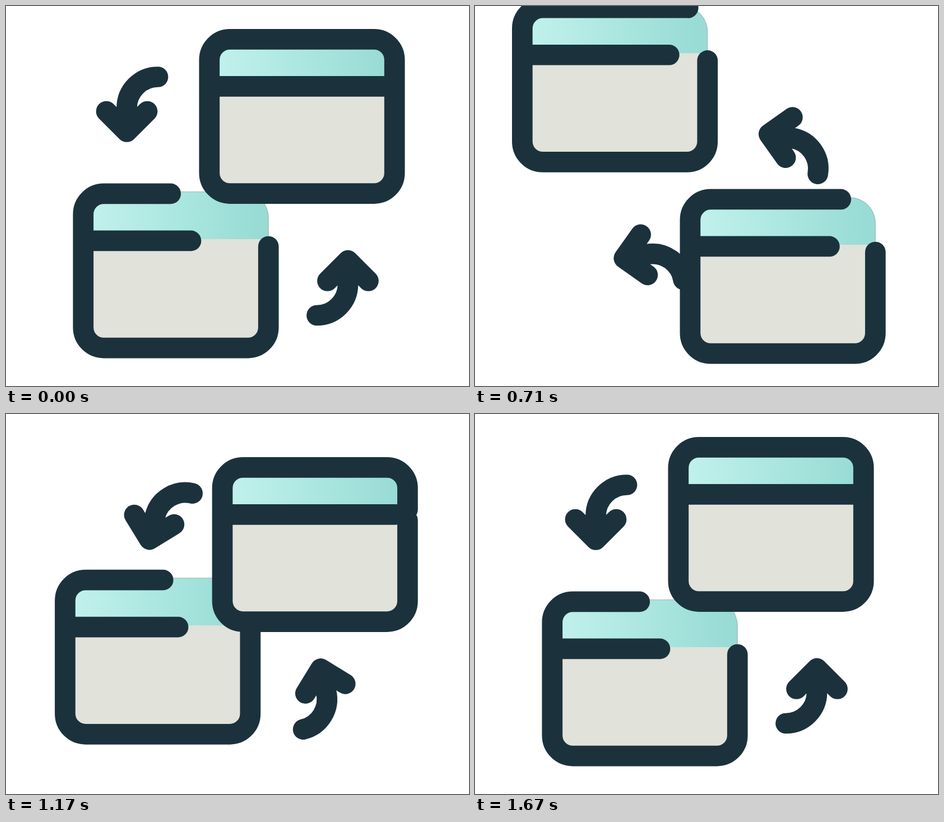
These frames come from a looping animation (826x678 px, 4000 ms). An HTML page with a canvas:

```html
<!DOCTYPE html>
<html lang="en">
<head>
<meta charset="utf-8">
<title>Swap windows</title>
<style>
html, body { margin: 0; width: 100%; height: 100%; overflow: hidden; background: #fff; }
canvas { display: block; }
</style>
</head>
<body>
<canvas id="stage" width="826" height="678"></canvas>
<script>
const ctx = document.getElementById('stage').getContext('2d');
const INK = '#1b323c', LINE = 36.7;
const LOOP = 4000, FPS = 24, FIRST = 10, STEPS = 30;

function track(d) {
  const path = document.createElementNS('http://www.w3.org/2000/svg', 'path');
  path.setAttribute('d', d);
  const length = path.getTotalLength();
  return e => path.getPointAtLength(length * e);
}

const windowUp = track('M303 472.5 C613.5 590 658.5 380 528 197');
const windowDown = track('M528 197 C203 -23 108 264 303 472.5');
const arrowDown = track('M215.5 206.5 C210.5 472 230 472 610 472');
const arrowUp = track('M610 472 C615 206.5 595.5 206.5 215.5 206.5');

// cubic-bezier(.333, 0, 0, 1), solved by bisection
function ease(x) {
  if (x <= 0) return 0;
  if (x >= 1) return 1;
  let lo = 0, hi = 1;
  for (let i = 0; i < 30; i++) {
    const s = (lo + hi) / 2;
    if ((1 - s) ** 2 * s + s ** 3 < x) lo = s; else hi = s;
  }
  return lo * lo * (3 - 2 * lo);
}

function inkStroke() {
  ctx.strokeStyle = INK;
  ctx.lineWidth = LINE;
  ctx.stroke();
}

function drawArrow(pos, turn) {
  ctx.save();
  ctx.translate(pos.x, pos.y);
  ctx.rotate(turn);
  ctx.beginPath();
  ctx.moveTo(55.5, -80);
  ctx.arc(55.5, -24.5, 55.5, -Math.PI / 2, Math.PI, true);
  ctx.lineTo(0, 18);
  ctx.moveTo(-36.5, -18.5);
  ctx.lineTo(0, 18);
  ctx.lineTo(36.5, -18.5);
  inkStroke();
  ctx.restore();
}

// closed: 0 leaves the top right corner open, 1 joins the outline
function drawWindow(pos, closed) {
  const w = 165.2, h = 137.6, r = 36.7;
  ctx.save();
  ctx.translate(pos.x, pos.y);

  ctx.fillStyle = '#e1e2da';
  ctx.beginPath();
  ctx.roundRect(-w, -57, 2 * w, h + 57, [0, 0, r, r]);
  ctx.fill();

  const teal = ctx.createLinearGradient(-w + 18, 0, w - 18, 0);
  teal.addColorStop(0, '#c0f1ec');
  teal.addColorStop(1, '#98dcd5');
  ctx.beginPath();
  ctx.moveTo(-w, -56.5);
  ctx.lineTo(-w, -95);
  ctx.arcTo(-w, -141, -w + 46, -141, 46);
  ctx.lineTo(w - 46, -141);
  ctx.arcTo(w, -141, w, -95, 46);
  ctx.lineTo(w, -56.5);
  ctx.fillStyle = teal;
  ctx.fill();
  ctx.strokeStyle = 'rgba(125,125,125,.55)';
  ctx.lineWidth = 1;
  ctx.stroke();

  ctx.beginPath();
  ctx.moveTo(w, -43.5);
  ctx.arcTo(w, h, -w, h, r);
  ctx.arcTo(-w, h, -w, -h, r);
  ctx.arcTo(-w, -h, 0, -h, r);
  const flat = w - r + 9.3, bend = r * Math.PI / 2;
  const grown = closed * (flat + bend + h - r - 43.5);
  ctx.lineTo(-9.3 + Math.min(grown, flat), -h);
  if (grown > flat) {
    const a = Math.min(grown - flat, bend) / r;
    ctx.arc(w - r, r - h, r, -Math.PI / 2, a - Math.PI / 2);
  }
  if (grown > flat + bend) ctx.lineTo(w, r - h + grown - flat - bend);
  ctx.moveTo(-w, -53.6);
  ctx.lineTo(27 + 126 * closed, -53.6);
  inkStroke();
  ctx.restore();
}

function draw(ms) {
  const tick = Math.floor((ms + 5) * FPS / 1000);
  const e = ease((tick - FIRST) / STEPS);
  ctx.fillStyle = '#fff';
  ctx.fillRect(0, 0, 826, 678);
  ctx.lineCap = ctx.lineJoin = 'round';

  drawArrow(arrowDown(e), Math.PI * e);
  drawArrow(arrowUp(e), Math.PI * (1 - e));

  const rising = () => drawWindow(windowUp(e), e);
  const falling = () => drawWindow(windowDown(e), 1 - e);
  const order = e < 0.5 ? [rising, falling] : [falling, rising];
  order.forEach(paint => paint());
}

const start = performance.now();
function loop() {
  draw((performance.now() - start) % LOOP);
  requestAnimationFrame(loop);
}
loop();
</script>
</body>
</html>
```
